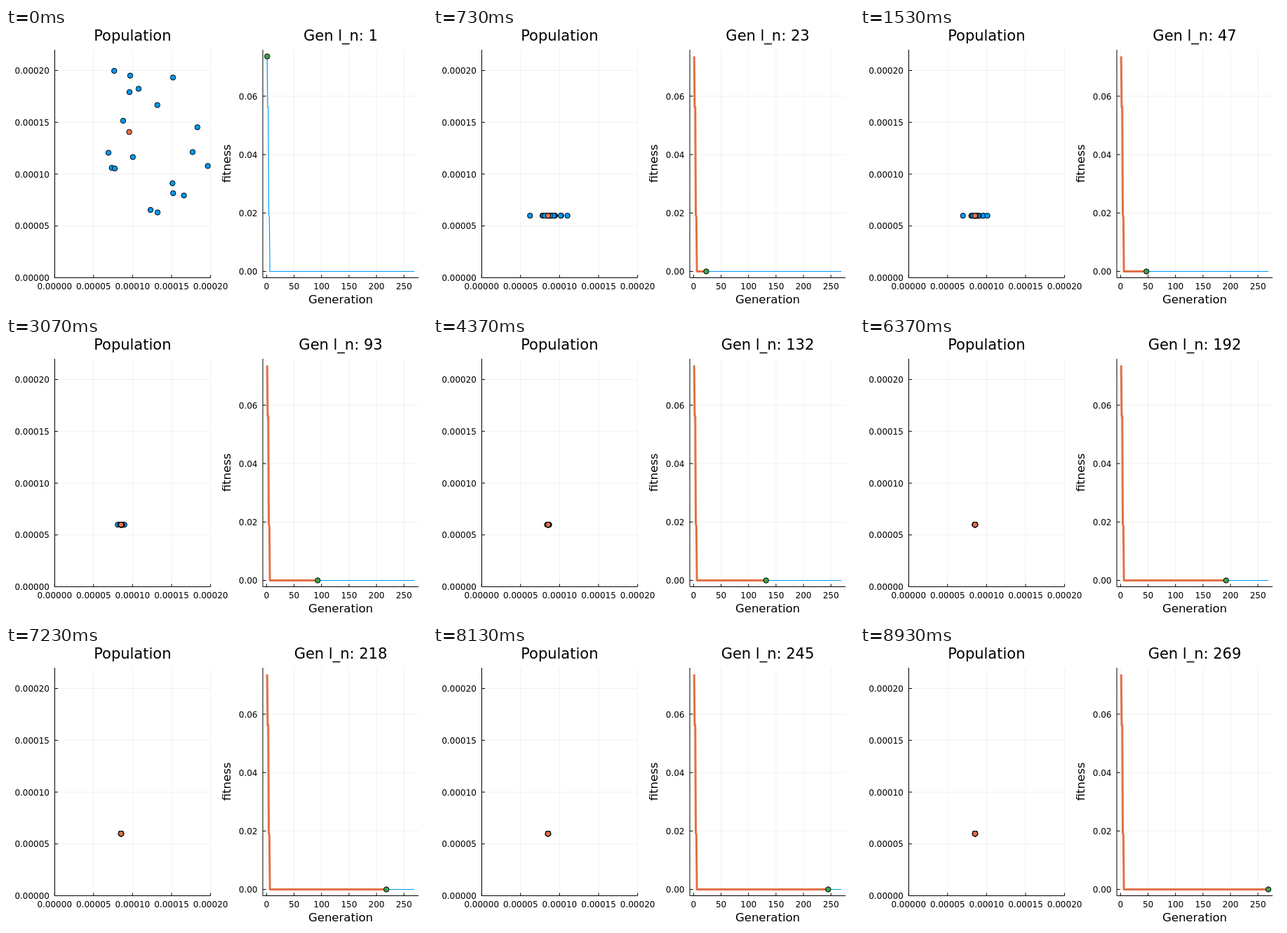
Recreate the animation shown at these times as an HTML page with a canvas. Size 600 by 400 pixels, loop 8960 ms.

```html
<!DOCTYPE html>
<html>
<head>
<meta charset="utf-8">
<style>
html, body { margin: 0; width: 100%; height: 100%; overflow: hidden; background: #fff; }
canvas { display: block; }
</style>
</head>
<body>
<canvas id="stage" width="600" height="400"></canvas>
<script>
const ctx = document.getElementById('stage').getContext('2d');
const BLUE = '#009afa', ORANGE = '#e36f47', GREEN = '#3ea44e';
const LOOP = 8960, LAST = 269, BEST_X = 164, FLOOR_Y = 267.2, MIN_X = 135.7;

// Start position of each individual and its x offset later, around generation 47
const people = [
  [154.2, 61, -5.3], [177, 67.8, -1], [189, 86.5, 4], [176, 91.3, 0], [238, 70.5, 6],
  [215.7, 109.7, 3], [167, 132, -1.5], [272.8, 141.3, 11.7], [146, 177.6, -17.2],
  [266, 176.6, 11.3], [180.8, 183.7, 1], [150.7, 199, -4.5], [155, 200, -3],
  [287.6, 196.4, 17.6], [237.3, 221, 5.5], [238.2, 235.2, 2], [253.6, 238.4, 4.5],
  [206, 259, 0], [216, 262.5, 1.5]
];
const fitness = [0.0736, 0.0563, 0.0563, 0.0195, 0.0185];
const fit = g => fitness[g - 1] || 0;
const genX = g => 371.4 + g * 0.783;
const fitY = f => 346.5 - f * 4158;

function line(points, color, width) {
  ctx.beginPath();
  points.forEach(p => ctx.lineTo(...p));
  ctx.strokeStyle = color;
  ctx.lineWidth = width;
  ctx.lineJoin = 'round';
  ctx.stroke();
}

function text(str, x, y, size, align = 'center') {
  ctx.font = size + 'px "DejaVu Sans", sans-serif';
  ctx.textAlign = align;
  ctx.fillStyle = '#000';
  ctx.fillText(str, x, y);
}

function dot(x, y, color) {
  ctx.beginPath();
  ctx.arc(x, y, 3.7, 0, 7);
  ctx.fillStyle = color;
  ctx.fill();
  ctx.strokeStyle = '#000';
  ctx.lineWidth = 1;
  ctx.stroke();
}

// Ticks are [position, label] pairs
function axes(left, right, xTicks, yTicks) {
  const top = 31, bottom = 355.5, grid = 'rgba(0,0,0,0.06)';
  for (const [x, label] of xTicks) {
    line([[x, top], [x, bottom]], grid, 1);
    line([[x, bottom], [x, bottom - 4]], '#000', 1);
    text(label, x, 371.5, 12);
  }
  for (const [y, label] of yTicks) {
    line([[left, y], [right, y]], grid, 1);
    line([[left, y], [left + 4.5, y]], '#000', 1);
    text(label, left - 7.5, y + 4.5, 12, 'right');
  }
  line([[left, top], [left, bottom], [right, bottom]], '#000', 1);
}

const ticks = (n, pos, label) => Array.from({ length: n }, (_, i) => [pos(i), label(i)]);
const small = i => (i * 0.00005).toFixed(5);
const curve = n => Array.from({ length: n }, (_, i) => [genX(i + 1), fitY(fit(i + 1))]);

function population(g) {
  const settle = Math.exp((1 - g) / 5), drop = Math.exp((1 - g) / 3);
  const spread = Math.min(1.5, Math.exp((47 - g) / 35));
  people.forEach(([x0, y0, offset], i) => {
    let x = BEST_X + offset * spread;
    // Now and then one individual mutates away to the left
    if (i === 8 && g % 7 === 3) x = BEST_X - 290 * Math.exp(-g / 32);
    x += (x0 - x) * settle;
    dot(Math.max(MIN_X, x), FLOOR_Y + (y0 - FLOOR_Y) * drop, BLUE);
  });
  const share = fit(g) / fitness[0];
  dot(BEST_X + 11.6 * share, FLOOR_Y - 119.2 * share, ORANGE);
}

function draw(g) {
  ctx.fillStyle = '#fff';
  ctx.fillRect(0, 0, 600, 400);

  axes(69.5, 291.5, ticks(5, i => 69.2 + i * 55.6, small), ticks(5, i => 355.5 - i * 73.75, small));
  text('Population', 180.3, 18, 21);
  population(g);

  axes(366, 588, ticks(6, i => genX(i * 50), i => i * 50),
    ticks(4, i => fitY(i * 0.02), i => (i * 0.02).toFixed(2)));
  text('Gen l_n: ' + g, 477, 18, 21);
  text('Generation', 477, 392, 16.5);
  ctx.save();
  ctx.translate(320, 193);
  ctx.rotate(-Math.PI / 2);
  text('fitness', 0, 0, 16.5);
  ctx.restore();
  line(curve(LAST), BLUE, 1.2);
  line(curve(g), ORANGE, 3);
  dot(genX(g), fitY(fit(g)), GREEN);
}

// 30 generations per second, with times rounded to 10 ms
function frame() {
  const t = Math.floor(performance.now() % LOOP / 10);
  draw(Math.min(LAST, 1 + Math.floor(0.3 * t + 0.15)));
  requestAnimationFrame(frame);
}
frame();
</script>
</body>
</html>
```
